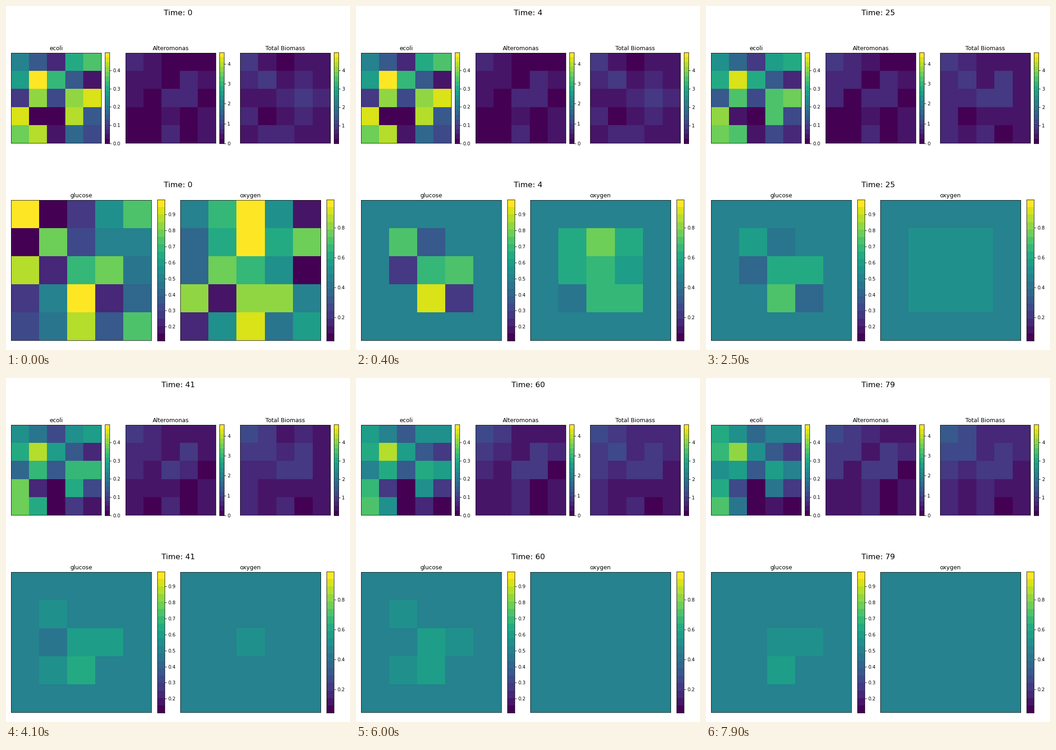
These frames come from a looping animation (748 by 748 pixels, 8000 ms). A matplotlib script:

```python
import numpy as np
import matplotlib.pyplot as plt
from matplotlib.animation import FuncAnimation

SIZE = 748
FRAMES = 80
TOP = 18   # highest colour level
REST = 8   # level at which the media settle
CMAP = plt.get_cmap("viridis").resampled(TOP + 1)

# Initial state of each field, in colour levels; everything later follows from rules.
ECOLI = np.array([[8, 5, 2, 11, 13], [10, 18, 12, 5, 1], [3, 15, 4, 15, 17],
                  [17, 0, 0, 16, 5], [14, 16, 1, 6, 4]], float)
ALTERO = np.array([[2, 1, 0, 0, 0], [1, 1, 0, 2, 1], [1, 0, 2, 2, 0],
                   [0, 0, 1, 0, 1], [0, 0, 2, 0, 1]], float)
GLUCOSE = np.array([[18, 0, 3, 9, 13], [0, 14, 4, 8, 8], [16, 2, 12, 14, 7],
                    [3, 8, 18, 2, 6], [4, 7, 16, 5, 13]], float)
OXYGEN = np.array([[8, 12, 18, 9, 1], [6, 11, 18, 11, 14], [6, 14, 12, 9, 0],
                   [15, 1, 15, 15, 8], [2, 9, 17, 7, 10]], float)

# Value range of each colour scale.
ECOLI_MAX, ALTERO_MAX = 0.4975, 4.57
TOTAL_MIN, TOTAL_MAX = 0.016, 4.985


def around(grid):
    """Sum of the four neighbours of every cell."""
    p = np.pad(grid, 1)
    return p[:-2, 1:-1] + p[2:, 1:-1] + p[1:-1, :-2] + p[1:-1, 2:]


def diffuse(start, rate):
    """Heat equation with the border held at REST from the first step on."""
    steps = [start]
    field = start
    for _ in range(FRAMES - 1):
        field = np.pad(field[1:-1, 1:-1], 1, constant_values=REST)
        flow = rate * (around(field) - 4 * field)
        field = field + np.pad(flow[1:-1, 1:-1], 1)
        steps.append(field)
    return steps


def drift(start, mixing, gain, slope):
    """Steady mixing with the neighbours plus growth fading away from the top left."""
    row, col = np.indices(start.shape)
    mean = around(start) / around(np.ones_like(start))
    change = mixing * (mean - start) + gain - slope * (row + col) / 8
    return [np.clip(start + change * t / (FRAMES - 1), 0, TOP)
            for t in range(FRAMES)]


def total(ecoli, altero):
    mass = (ecoli * ECOLI_MAX + altero * ALTERO_MAX) / TOP
    return (mass - TOTAL_MIN) / (TOTAL_MAX - TOTAL_MIN) * TOP


ecoli = drift(ECOLI, 0.5, 3, 10)
altero = drift(ALTERO, 0, 2.3, 2.5)
biomass = [total(e, a) for e, a in zip(ecoli, altero)]
histories = [ecoli, altero, biomass, diffuse(GLUCOSE, 0.007), diffuse(OXYGEN, 0.05)]

fig = plt.figure(figsize=(10, 10), dpi=SIZE / 10, facecolor="white")


def axes_px(left, top, right, bottom):
    return fig.add_axes([left / SIZE, 1 - bottom / SIZE,
                         (right - left) / SIZE, (bottom - top) / SIZE])


def panel(title, box, bar, lo, hi, ticks, fmt):
    ax = axes_px(*box)
    ax.set_title(title, fontsize=12, pad=6)
    ax.set(xticks=[], yticks=[])
    im = ax.imshow(np.zeros((5, 5)), cmap=CMAP, vmin=-0.5, vmax=TOP + 0.5,
                   aspect="auto", interpolation="nearest")
    cax = axes_px(*bar)
    cax.imshow(np.arange(TOP + 1)[:, None], cmap=CMAP, origin="lower",
               extent=(0, 1, lo, hi), aspect="auto", interpolation="nearest")
    cax.set_xticks([])
    cax.yaxis.tick_right()
    cax.set_yticks(ticks, [fmt % v for v in ticks])
    cax.tick_params(labelsize=10)
    cax.set_ylim(lo, hi)
    return im


def small(title, x, *scale):
    return panel(title, (x, 102, x + 196, 298), (x + 204, 101, x + 214, 299), *scale)


def large(title, x, *scale):
    return panel(title, (x, 422, x + 305, 727), (x + 318, 421, x + 334, 728), *scale)


tenths = np.arange(10) / 10
images = [
    small("ecoli", 11, 0, ECOLI_MAX, tenths[:5], "%.1f"),
    small("Alteromonas", 260, 0, ALTERO_MAX, range(5), "%d"),
    small("Total Biomass", 509, TOTAL_MIN, TOTAL_MAX, range(1, 5), "%d"),
    large("glucose", 11, 0.112, 0.992, tenths[2:], "%.1f"),
    large("oxygen", 379, 0.043, 0.986, tenths[2:9:2], "%.1f"),
]
clocks = [fig.text(0.5, 1 - y / SIZE, "", fontsize=16, ha="center", va="baseline")
          for y in (20, 394)]


def update(t):
    for im, history in zip(images, histories):
        im.set_data(history[t])
    for clock in clocks:
        clock.set_text(f"Time: {t}")
    return images + clocks


anim = FuncAnimation(fig, update, frames=FRAMES, interval=100,
                     repeat=True, repeat_delay=0, blit=False)
plt.show()
```
